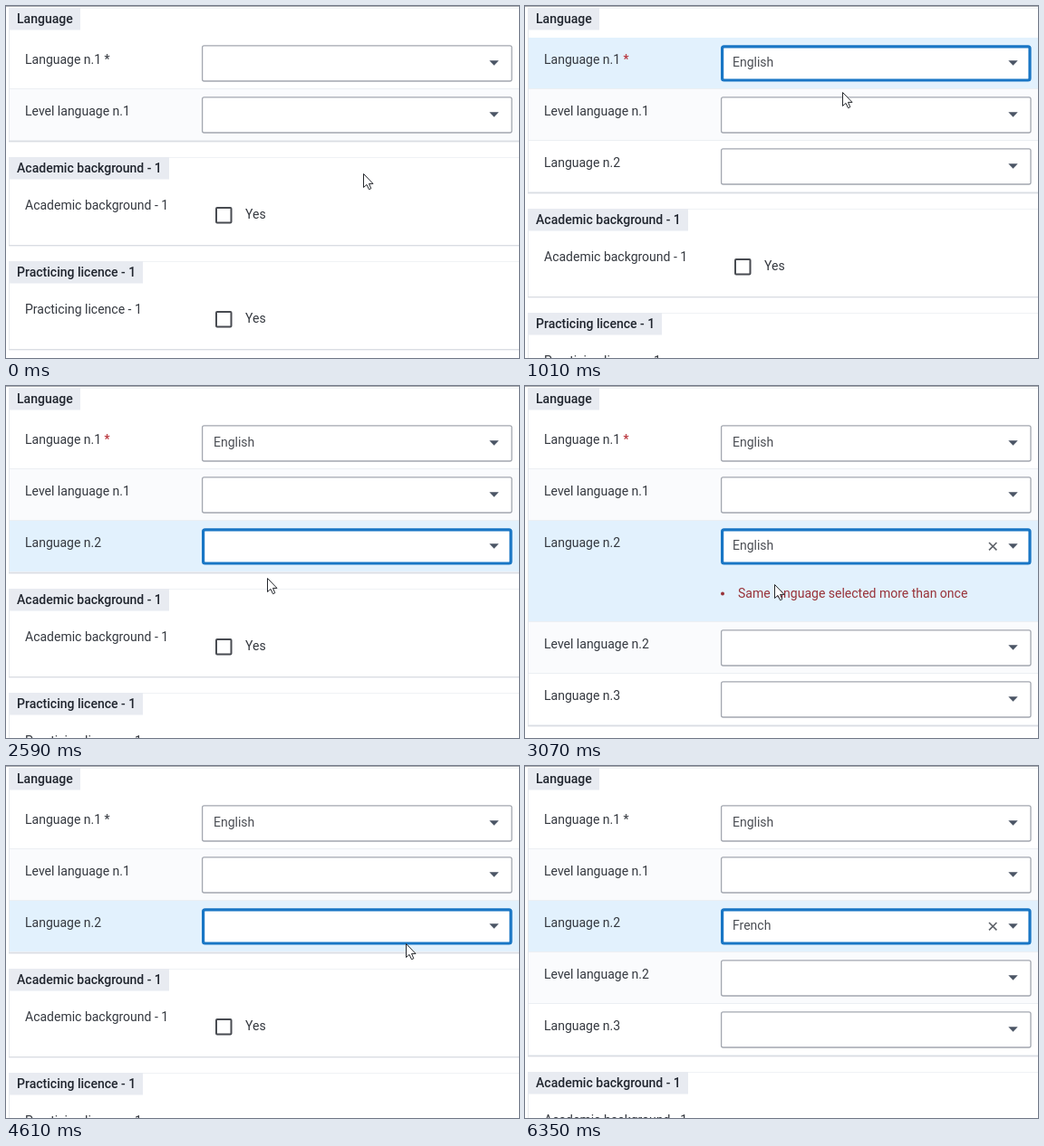
These frames come from a looping animation (566 by 389 pixels, 6.45 s). An HTML page:

```html
<!DOCTYPE html>
<html lang="en">
<head>
<meta charset="utf-8">
<title>Language form</title>
<style>
  html, body { margin: 0; width: 566px; height: 389px; overflow: hidden; background: #fff; }
  svg { display: block; }
  text { font: 14px Roboto, Arial, sans-serif; fill: #34383f; white-space: pre; }
  .head { font-weight: 500; fill: #20252e; }
  .value { fill: #4a4d53; }
  .error { fill: #983238; }
  .field { fill: #fff; stroke: #a3a7b0; stroke-width: 1.3; }
  .focus { stroke: #1976c5; stroke-width: 3.2; }
  .arrow { fill: #4b5565; }
  .cursor { fill: #fff; stroke: #25282d; stroke-linejoin: round; }
</style>
</head>
<body>
<svg width="566" height="389" viewBox="0 0 566 389">
  <g id="form"></g>
  <path id="clear" d="M512 173l8.4 8.4m0-8.4l-8.4 8.4" stroke="#5c6067" stroke-width="1.6"/>
  <path id="pointer" class="cursor" d="M.5 .5V15.5L4 12.4L6.5 17.7L8.8 16.7L6.5 11.4H11Z"/>
  <path id="hand" class="cursor" d="M-1.5 12V1.8a1.7 1.7 0 0 1 3.4 0V8q1.6-1.5 3 .3q1.6-1.1 2.7 .6q2-.6 2 1.8V15l-1.8 5.5H0L-5 13.7q-1.4-2.4 .6-2.7q1.1 0 2.9 2.3M1.9 8v4M4.9 8.5V12M7.6 9v3"/>
</svg>
<script>
const LOOP = 6450;
const $ = id => document.getElementById(id);

// Moments at which the form changes
const FOCUS_1 = 450, PICK_1 = 860, FOCUS_2 = 2200, PICK_2 = 2700, CLEAR = 3880, REPICK = 5020;

// Pointer stops: time, x, y
const path = [
  [0, 394, 185], [110, 394, 185], [450, 375, 66], [700, 352, 90], [1010, 350, 95], [1420, 350, 97],
  [1990, 352, 179], [2300, 340, 182], [2700, 276, 219], [3090, 275, 219], [3250, 280, 219],
  [3760, 521, 173], [4040, 521, 171], [4430, 500, 178], [4960, 282, 245], [5260, 282, 246],
  [5410, 286, 249], [6040, 385, 350], [6250, 410, 395], [LOOP, 410, 395]
];

const text = (x, y, s, cls = '') => `<text x="${x}" y="${y}" class="${cls}">${s}</text>`;
const rect = (x, y, w, h, fill) => `<rect x="${x}" y="${y}" width="${w}" height="${h}" fill="${fill}"/>`;

function card(y, bottom, title, tagWidth) {
  return rect(3, y, 563, 1, '#f0f2f5') + rect(3, y, 1, bottom - y, '#e6e9ee') +
    rect(3, bottom, 563, 1, '#dadde3') + rect(3, bottom + 1, 563, 1, '#f1f2f5') +
    rect(3, y, tagWidth, 24.5, '#e8ebf1') + text(12, y + 17, title, 'head');
}

function row(y, height, label, value, focused) {
  const level = label.startsWith('Level');
  const inset = focused ? 1.6 : .6;
  return rect(4, y, 562, height, focused ? '#e2f1fd' : level ? '#fafbfd' : '#fff') +
    rect(4, y + height - 1, 562, 1, '#eceff3') +
    text(21, y + 28.5, label) +
    `<rect x="${216 + inset}" y="${y + 8.2 + inset}" width="${342.6 - 2 * inset}" height="${40.4 - 2 * inset}"
      rx="2" class="field ${focused ? 'focus' : ''}"/>` +
    text(229, y + 31.5, value, 'value') +
    `<path class="arrow" d="M533.3 ${y + 25.2}h10.4l-5.2 5.6z"/>`;
}

function checkCard(y, title, tagWidth) {
  return card(y, y + 97, title, tagWidth) + text(21, y + 58, title) +
    `<rect x="232" y="${y + 56}" width="16.5" height="16.5" rx="1" fill="none" stroke="#484b51" stroke-width="2"/>` +
    text(264, y + 68, 'Yes');
}

function form(t) {
  const focus = t < FOCUS_1 ? 0 : t < FOCUS_2 ? 1 : 2;
  const error = t >= PICK_2 && t < CLEAR;
  const second = error ? 'English' : t >= REPICK ? 'French' : '';
  const red = t >= PICK_1 && t < CLEAR;
  const rows = [
    [`Language n.1 <tspan fill="${red ? '#b3262e' : '#34383f'}">*</tspan>`, t >= PICK_1 ? 'English' : '', focus === 1],
    ['Level language n.1', '']
  ];
  if (t >= PICK_1) rows.push(['Language n.2', second, focus === 2]);
  if (second) rows.push(['Level language n.2', ''], ['Language n.3', '']);

  let y = 35, body = '';
  rows.forEach(([label, value, focused], i) => {
    const height = i === 2 && error ? 112 : 57;
    body += row(y, height, label, value, focused);
    y += height;
  });
  if (error) body += '<circle cx="218" cy="229.5" r="2" class="error"/>' +
    text(235, 234, 'Same language selected more than once', 'error');
  return body + rect(0, 0, 566, 1, '#a9abb0') + card(2, y, 'Language', 79) +
    checkCard(y + 18, 'Academic background - 1', 177) +
    checkCard(y + 133, 'Practicing licence - 1', 148);
}

function pointerAt(t) {
  const i = path.findIndex(p => p[0] > t);
  const [t0, x0, y0] = path[i - 1], [t1, x1, y1] = path[i];
  const u = (t - t0) / (t1 - t0), k = u * u * (3 - 2 * u);
  return [x0 + (x1 - x0) * k, y0 + (y1 - y0) * k];
}

function clearOpacity(t) {
  const since = t >= REPICK ? t - REPICK : t >= PICK_2 && t < CLEAR ? t - PICK_2 : 0;
  return Math.min(1, since / 250) ** 3;
}

let shown = '';
function frame() {
  const t = performance.now() % LOOP;
  const markup = form(t);
  if (markup !== shown) $('form').innerHTML = shown = markup;
  $('clear').style.opacity = clearOpacity(t);

  const overClear = t >= 3700 && t < 4200;
  const place = `translate(${pointerAt(t).map(Math.round)})`;
  for (const id of ['pointer', 'hand']) {
    $(id).setAttribute('transform', place);
    $(id).style.display = (id === 'hand') === overClear ? '' : 'none';
  }
  requestAnimationFrame(frame);
}
frame();
</script>
</body>
</html>
```
